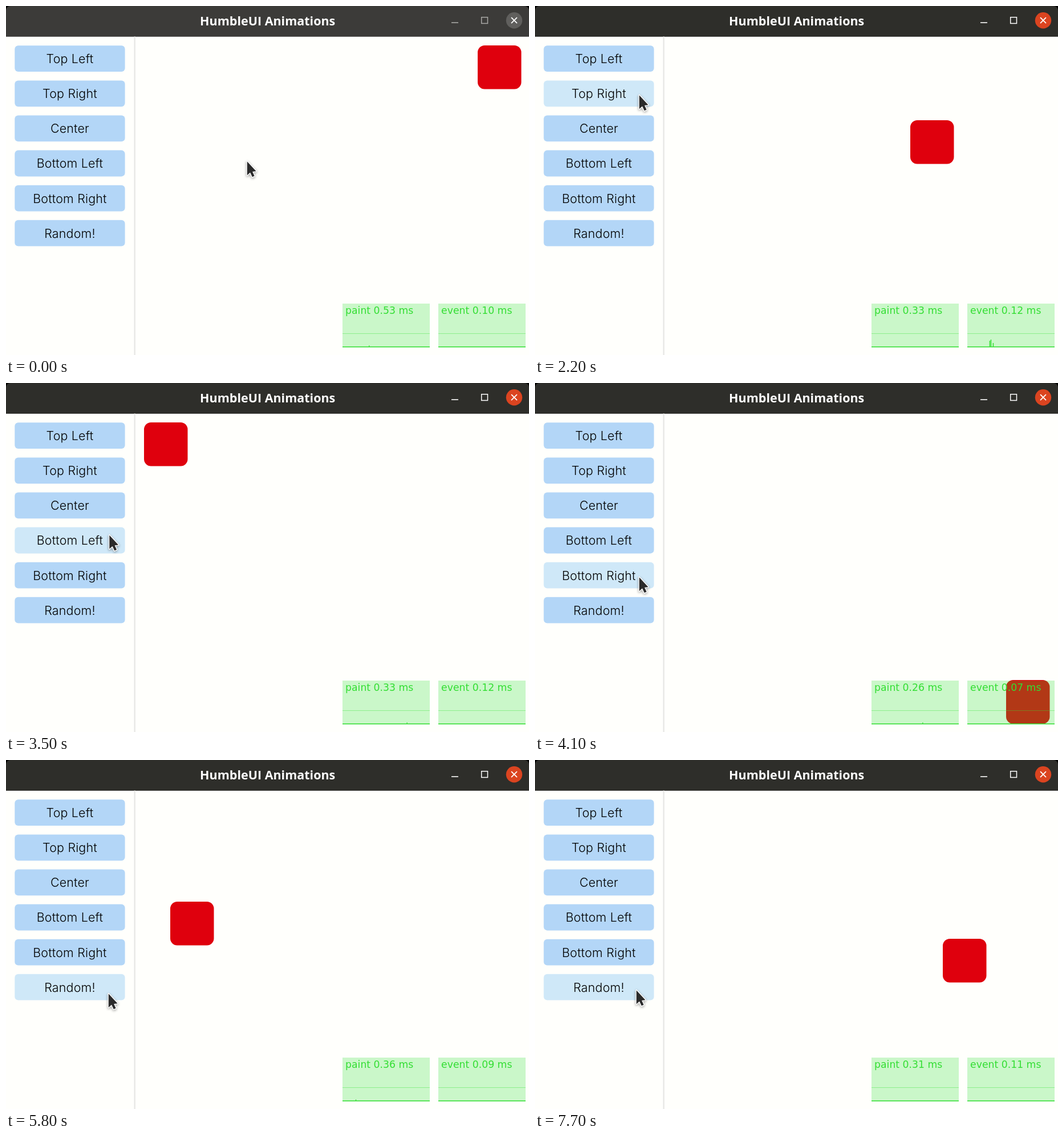
Recreate the animation shown at these times as an HTML page with a canvas. Size 917 px wide and 611 px high, loop 8 s.

```html
<!DOCTYPE html>
<html lang="en">
<head>
<meta charset="utf-8">
<title>HumbleUI Animations</title>
<style>
  html, body { margin: 0; width: 100%; height: 100%; overflow: hidden; background: #fffffc; }
  canvas { display: block; }
</style>
</head>
<body>
<canvas id="stage" width="917" height="611"></canvas>
<script>
const ctx = document.getElementById("stage").getContext("2d");
const LOOP = 8000, STEP = 100;
const HOLD = 80, GLIDE = 300;       // press to release, then the box moves
const TRAVEL = 380, REST = 200;     // pointer trip, then its wait before the release
const GREEN = "#33de33";

const LABELS = ["Top Left", "Top Right", "Center", "Bottom Left", "Bottom Right", "Random!"];
const BUTTON = { x: 15.3, y: 69.3, w: 193.3, h: 45.8, pitch: 61.1 };

const SIZE = 76.5, LEFT = 242, RIGHT = 827, TOP = 69.4, BOTTOM = 520.8;
const MIDDLE = [(LEFT + RIGHT) / 2, (TOP + BOTTOM) / 2];

// Release time, pointer tip, box target and the timings then measured.
const START = { tip: [423, 271], box: [RIGHT, TOP], ms: [.53, .10] };
const CLICKS = [
  { at: 1022, tip: [188, 213], box: MIDDLE, ms: [.27, .08] },
  { at: 2150, tip: [183, 155], box: [RIGHT, TOP], ms: [.42, .17] },
  { at: 3050, tip: [178, 93], box: [LEFT, TOP], ms: [.33, .12] },
  { at: 3838, tip: [183, 339], box: [RIGHT, BOTTOM], ms: [.26, .07] },
  { at: 4696, tip: [174, 272], box: [LEFT, BOTTOM], ms: [.31, .08] },
  { at: 5677, tip: [180, 408], box: [300, 177], ms: [.37, .09] },
  { at: 6503, tip: [178, 402], box: [610, 380], ms: [.34, .10] },
  { at: 7390, tip: [178, 402], box: [715, 313], ms: [.31, .11] },
];

const smooth = k => k * k * (3 - 2 * k);
const easeOut = k => 1 - (1 - k) ** 3;
const clamp = k => Math.min(1, Math.max(0, k));
const mix = (a, b, k) => a + (b - a) * k;

// Carries one property through all clicks, each easing it to its next value.
function follow(prop, t, delay, duration, ease) {
  return CLICKS.reduce((value, click) => {
    const k = ease(clamp((t - click.at - delay) / duration));
    return value.map((v, i) => mix(v, click[prop][i], k));
  }, START[prop]);
}

function rect(x, y, w, h, fill) {
  ctx.fillStyle = fill;
  ctx.fillRect(x, y, w, h);
}

function roundRect(x, y, w, h, r, fill) {
  ctx.fillStyle = fill;
  ctx.beginPath();
  ctx.roundRect(x, y, w, h, r);
  ctx.fill();
}

function text(str, x, y, font, fill, align, spacing = 0) {
  ctx.font = font;
  ctx.letterSpacing = `${spacing}px`;
  ctx.fillStyle = fill;
  ctx.textAlign = align;
  ctx.fillText(str, x, y);
}

function line(x1, y1, x2, y2, color, width) {
  ctx.strokeStyle = color;
  ctx.lineWidth = width;
  ctx.beginPath();
  ctx.moveTo(x1, y1);
  ctx.lineTo(x2, y2);
  ctx.stroke();
}

function drawHeader(focused) {
  const icon = focused ? "#ffffff" : "#a9a9a6";
  rect(0, 0, 20, 20, "#000000");
  rect(897, 0, 20, 20, "#000000");
  roundRect(0, 0, 917, 53.5, [8, 8, 0, 0], focused ? "#2e2e2a" : "#3c3b39");
  rect(0, 52.7, 917, .8, focused ? "#1d1d1a" : "#353432");
  text("HumbleUI Animations", 458.7, 34,
    '700 21.5px "Open Sans", "Noto Sans", sans-serif', "#ffffff", "center");
  line(781, 29.2, 793, 29.2, icon, 1.6);
  ctx.lineWidth = 1.5;
  ctx.strokeRect(833.7, 19.7, 10.8, 10.8);
  ctx.fillStyle = focused ? "#db4420" : "#605f5d";
  ctx.beginPath();
  ctx.arc(891, 25.2, 14.2, 0, Math.PI * 2);
  ctx.fill();
  line(886, 20.2, 896, 30.2, "#ffffff", 1.7);
  line(896, 20.2, 886, 30.2, "#ffffff", 1.7);
}

function drawButtons(px, py, pressed) {
  const { x, w, h, pitch } = BUTTON;
  LABELS.forEach((label, i) => {
    const y = BUTTON.y + i * pitch;
    const over = px >= x && px <= x + w && py >= y && py <= y + h;
    const fill = !over ? "#b3d6f7" : pressed ? "#a4c5e7" : "#cfe8f8";
    roundRect(x, y, w, h, 6.1, fill);
    text(label, x + w / 2, y + 30.8, "350 21.4px Inter, sans-serif", "#000000", "center", .2);
  });
}

function drawPanel(x, name, value) {
  rect(x, 521, 153, 76.3, "rgba(47,223,48,.25)");
  rect(x, 573, 153, 1, "rgba(51,222,51,.4)");
  rect(x, 596, 153, 1.5, GREEN);
  text(`${name} ${value.toFixed(2)} ms`, x + 5.1, 539.4,
    '17.25px "DejaVu Sans", sans-serif', GREEN, "left");
}

// A bar that enters a panel at a given time and drifts left out of it.
function drawSpike(t, panel, from, x, speed, height) {
  const left = x - (t - from) * speed / 1000;
  if (t >= from && left >= panel && left <= panel + 151) {
    rect(left, 596 - height, 1.5, height, GREEN);
  }
}

function drawPointer(x, y) {
  const shape = [[0, 0], [0, 24], [5.3, 19.2], [9, 27], [12.8, 25.3], [9.3, 17.6], [15.8, 17]];
  ctx.save();
  ctx.translate(x - .2, y + 1.3);
  ctx.beginPath();
  shape.forEach(([px, py]) => ctx.lineTo(px, py));
  ctx.closePath();
  ctx.lineJoin = "round";
  ctx.shadowColor = "rgba(0,0,0,.4)";
  ctx.shadowBlur = 4;
  ctx.shadowOffsetY = 1.5;
  ctx.strokeStyle = "#ffffff";
  ctx.lineWidth = 2.8;
  ctx.stroke();
  ctx.shadowColor = "transparent";
  ctx.fillStyle = "#2b2b2b";
  ctx.fill();
  ctx.restore();
}

function draw(t) {
  const [px, py] = follow("tip", t, -REST - TRAVEL, TRAVEL, smooth);
  const [bx, by] = follow("box", t, 0, GLIDE, easeOut).map(Math.round);
  const [paint, event] = follow("ms", t, 0, GLIDE, easeOut);
  const pressed = CLICKS.some(({ at }) => t >= at - HOLD && t < at);

  rect(0, 0, 917, 611, "#fffffc");
  drawHeader(t >= CLICKS[0].at - HOLD);
  rect(224.5, 53.5, 2.4, 558, "#e8e8e6");
  drawButtons(px, py, pressed);
  roundRect(bx, by, SIZE, SIZE, 12.2, "#df000d");

  drawPanel(590, "paint", paint);
  drawSpike(t, 590, 0, 636, 24.3, 1.5);
  drawSpike(t, 590, 3050, 720, 39, 1.5);
  drawPanel(758, "event", event);
  [10, 12, 6].forEach((height, i) => drawSpike(t, 758, 1100, 910 + i * (i + 1), 103, height));
  drawPointer(px, py);
}

function tick(now) {
  draw(Math.floor((now % LOOP) / STEP) * STEP);
  requestAnimationFrame(tick);
}
requestAnimationFrame(tick);
</script>
</body>
</html>
```
